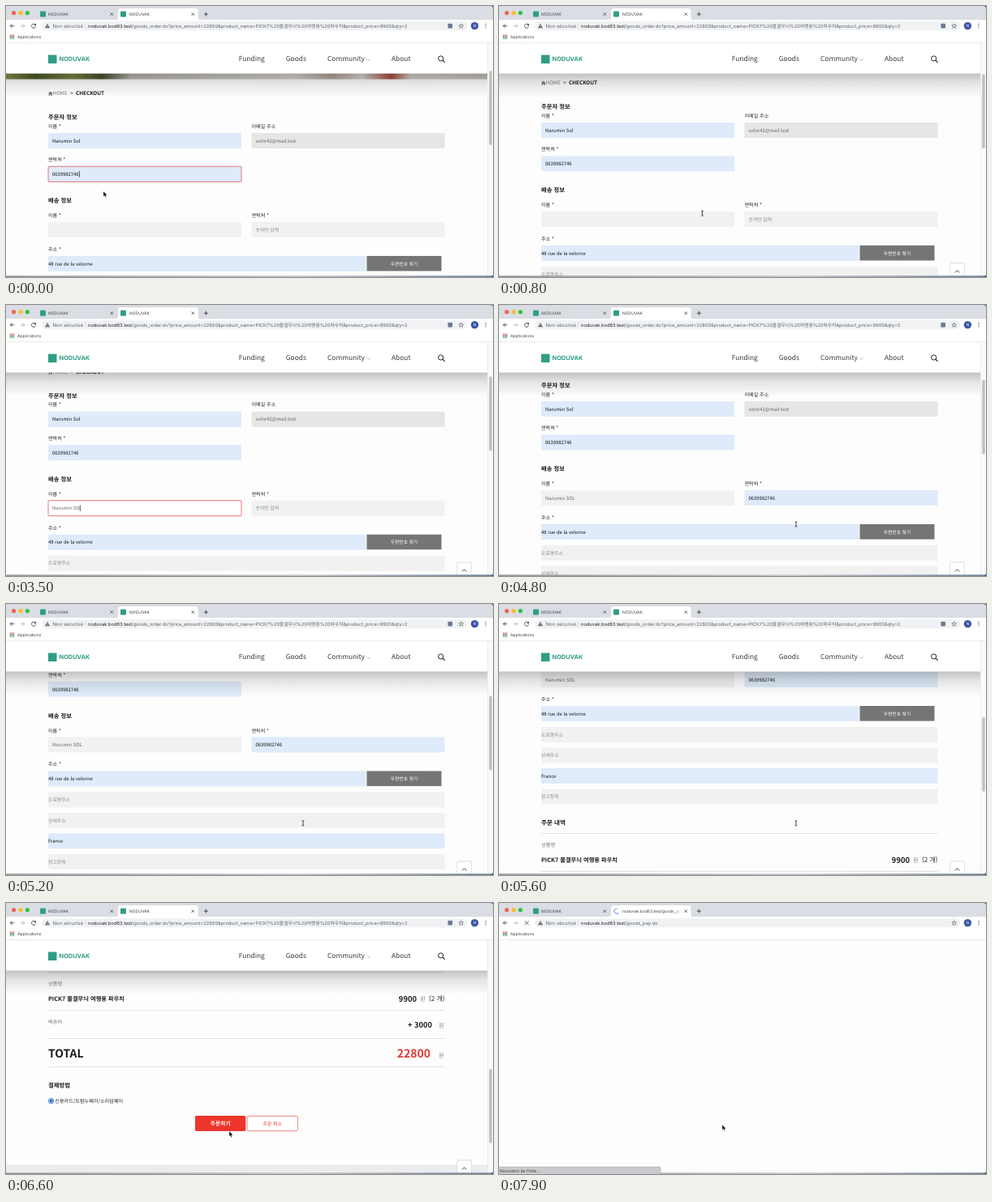
These frames come from a looping animation (600x335 px, 8 s). An HTML page:

```html
<!DOCTYPE html>
<html lang="ko">
<head>
<meta charset="utf-8">
<title>Checkout</title>
<style>
  html, body { margin: 0; width: 100%; height: 100%; overflow: hidden; background: #fdfdfd; }
  svg { display: block; width: 100%; height: 100%; }
  text { font-family: "Noto Sans CJK KR", "Noto Sans KR", "Noto Sans CJK", sans-serif; white-space: pre; text-rendering: geometricPrecision; }
  text.ui { font-family: Inter, "Noto Sans CJK KR", sans-serif; }
</style>
</head>
<body>
<svg id="stage" viewBox="0 0 600 335">
  <defs>
    <linearGradient id="photo">
      <stop offset="0" stop-color="#87934c"/><stop offset=".06" stop-color="#4d5a2a"/>
      <stop offset=".14" stop-color="#7d8b45"/><stop offset=".2" stop-color="#49512f"/>
      <stop offset=".26" stop-color="#bdbab2"/><stop offset=".6" stop-color="#d8d5d1"/>
      <stop offset=".68" stop-color="#b9a79b"/><stop offset=".74" stop-color="#dedbd8"/>
      <stop offset=".8" stop-color="#a8503f"/><stop offset=".84" stop-color="#d9d4cf"/>
      <stop offset="1" stop-color="#c9c4bd"/>
    </linearGradient>
    <linearGradient id="shade" x2="0" y2="1">
      <stop offset="0" stop-opacity=".24"/><stop offset=".4" stop-opacity=".1"/><stop offset="1" stop-opacity="0"/>
    </linearGradient>
    <linearGradient id="fade">
      <stop offset="0" stop-color="#fff" stop-opacity="0"/><stop offset="1" stop-color="#fff"/>
    </linearGradient>
    <linearGradient id="edge">
      <stop offset="0" stop-color="#94979b"/><stop offset=".6" stop-color="#c3c6ca"/><stop offset="1" stop-color="#6f7f98"/>
    </linearGradient>
  </defs>
</svg>
<script>
const LOOP = 8000, STEP = 100;
const RED = '#e8392f', TEAL = '#2f9e84', BLUE = '#dfebfa', GREY = '#f1f1f1', INK = '#1b1b1b', DIM = '#777';
const BRAND = 'NODUVAK', HOST = 'noduvak.bod63.test', PHONE = '0639982746', NAME = 'Narumin SOL';
const ITEM = ['PICK7', '물결무늬', '여행용', '파우치'];
const stage = document.getElementById('stage');

function add(parent, tag, attrs = {}) {
  const node = document.createElementNS('http://www.w3.org/2000/svg', tag);
  set(node, attrs);
  return parent.appendChild(node);
}
function set(node, attrs) {
  for (const key in attrs) node.setAttribute(key, attrs[key]);
}
const group = (parent, attrs) => add(parent, 'g', attrs);
const rect = (parent, x, y, width, height, fill, more) =>
  add(parent, 'rect', { x, y, width, height, fill, ...more });
const dot = (parent, cx, cy, r, fill, more) => add(parent, 'circle', { cx, cy, r, fill, ...more });
const line = (parent, d, stroke, width = 1, more) =>
  add(parent, 'path', { d, stroke, 'stroke-width': width, fill: 'none', ...more });
const show = (node, on) => set(node, { visibility: on ? 'visible' : 'hidden' });

// y is the middle of the capitals
function text(parent, x, y, str, size, fill = INK, more) {
  const node = add(parent, 'text', { x, y: y + size * .36, 'font-size': size, fill, ...more });
  node.textContent = str;
  return node;
}
const ui = (parent, x, y, str, size, fill, more) =>
  text(parent, x, y, str, size, fill, { class: 'ui', ...more });
const BOLD = { 'font-weight': 700 }, MEDIUM = { 'font-weight': 500 };
const MIDDLE = { 'text-anchor': 'middle' }, END = { 'text-anchor': 'end' };

function field(x, y, w, str, fill, color, pad = 5) {
  const box = rect(page, x, y, w, 19, fill, { rx: 1 });
  const label = text(page, x + pad, y + 9.6, str, 5.88, color);
  return { box, label };
}
const label = (x, y, str) => text(page, x, y, str, 6.1, '#222');
const heading = (y, str, size = 7.3) => text(page, 52, y, str, size, INK, BOLD);

rect(stage, 0, 0, 600, 335, '#fdfdfd');

// Shop page, laid out at scroll zero
const shop = group(stage);
const page = group(shop);
rect(page, 0, 46, 593, 44.5, 'url(#photo)');
add(page, 'path', { d: 'M52 108.3L54.8 105.4L57.6 108.3H56.8V111H55.4V109H54.2V111H52.8V108.3Z', fill: DIM });
text(page, 57.6, 108, 'HOME', 6.3, DIM);
text(page, 79.3, 108, '>', 6.3, INK, MEDIUM);
text(page, 86, 108, 'CHECKOUT', 6.4, INK, BOLD);

heading(137.5, '주문자 정보');
label(52, 148.5, '이름 *');
label(302.5, 148.5, '이메일 주소');
field(52, 157, 238, 'Narumin Sol', BLUE, '#111');
field(302.5, 157, 238, 'solnr42@mail.test', '#e6e6e6', '#666');
label(52, 190, '연락처 *');
const phone = field(52, 198.3, 238, PHONE, BLUE, '#111');

heading(240.5, '배송 정보');
label(52, 259, '이름 *');
label(302.5, 259, '연락처 *');
const name = field(52, 267, 238, '', GREY, '#666');
const contact = field(302.5, 267, 238, '', GREY, '#888');
label(52, 300.8, '주소 *');
field(52, 309, 391.5, '48 rue de la velorne', BLUE, '#111', 0);
rect(page, 444.5, 309, 92, 18.6, '#757575');
text(page, 490.5, 318.5, '우편번호 찾기', 5.8, '#fff', MIDDLE);
['도로명주소', '상세주소', 'France', '참고항목'].forEach((str, i) => {
  const filled = i === 2;
  field(52, 335 + i * 25.5, 488.5, str, filled ? BLUE : GREY, filled ? '#111' : '#888', 0);
});

heading(453.5, '주문 내역', 7.6);
for (const y of [466, 513, 548, 583]) rect(page, 52, y, 488.5, .8, '#dedede');
text(page, 52, 481, '상품명', 6.3, DIM);
text(page, 52, 499.3, ITEM.join(' '), 7.25, INK, BOLD);
text(page, 506, 499.3, '9900', 9.4, INK, { ...BOLD, ...END });
text(page, 510, 499.8, '원', 7.3, '#888');
text(page, 521, 499.5, '(2 개)', 8, '#222');
text(page, 52, 528, '배송비', 6.3, DIM);
text(page, 525, 532, '+ 3000', 9.3, INK, { ...BOLD, ...END });
text(page, 533, 532.6, '원', 7.3, '#888');
text(page, 52, 567, 'TOTAL', 13.9, INK, BOLD);
text(page, 523, 567, '22800', 14, '#df3a34', { ...BOLD, ...END });
text(page, 533, 569, '원', 7.3, '#888');
heading(606.3, '결제방법');
dot(page, 55.6, 625.7, 3.2, '#fff', { stroke: '#2c6ccb', 'stroke-width': .9 });
dot(page, 55.6, 625.7, 2.1, '#2c6ccb');
text(page, 60.3, 625.3, '신용카드/도람누페이/소리담페이', 6.15, '#222');
rect(page, 233, 644, 62.3, 19, '#ee352c', { rx: 1.5 });
text(page, 264.3, 653.8, '주문하기', 6.8, '#fff', { ...BOLD, ...MIDDLE });
rect(page, 297, 644.4, 62.3, 18.4, '#fff', { rx: 1.5, stroke: '#e8675f', 'stroke-width': .8 });
text(page, 328.2, 653.8, '주문 취소', 5.9, RED, MIDDLE);
rect(page, 0, 704.5, 593, 60, '#ececec');
const caret = rect(page, 0, 0, .7, 7.4, '#111');

// Fixed shop header
rect(shop, 0, 83, 593, 30, 'url(#shade)');
rect(shop, 0, 45, 593, 38.5, '#fff');
rect(shop, 52, 60.5, 10.5, 10.5, TEAL);
ui(shop, 65.5, 65.8, BRAND, 7.4, TEAL, BOLD);
for (const [x, str] of [[286.8, 'Funding'], [344.8, 'Goods'], [396, 'Community'], [475, 'About']])
  text(shop, x, 65.2, str, 8.4, '#3a3a3a');
line(shop, 'M444.6 65.4L446.7 67.4L448.8 65.4', '#999', .7);
dot(shop, 535.7, 64.9, 3.1, 'none', { stroke: '#222', 'stroke-width': 1 });
line(shop, 'M538 67.2L540.6 69.8', '#222', 1.1);

rect(shop, 593, 46, 7, 289, '#fafafa');
rect(shop, 593, 46, .6, 289, '#e4e4e4');
const thumb = rect(shop, 595.2, 80, 3.6, 92, '#c1c1c1', { rx: 1.8 });

const toTop = group(shop);
rect(toTop, 555.4, 317.6, 18.6, 20, '#000', { opacity: .1, rx: 1.5 });
rect(toTop, 556, 318.2, 17.4, 20, '#fff', { rx: 1, stroke: '#d8d8d8', 'stroke-width': .5 });
line(toTop, 'M561.8 329.6L564.6 326.8L567.4 329.6', '#333', .9);

// Browser frame
rect(stage, 0, 0, 600, 17.5, '#dadde3');
add(stage, 'path', { d: 'M134.5 17.5Q138 17.5 138 14V6Q138 3 141 3H233.5Q236.5 3 236.5 6V14Q236.5 17.5 240 17.5Z', fill: '#fff' });
rect(stage, 0, 17, 600, 28.5, '#fff');
rect(stage, 0, 45, 600, .7, '#dfe1e4');
['#f75f57', '#f9bc2f', '#2fc440'].forEach((fill, i) => dot(stage, 9.6 + i * 8.4, 8.6, 2.6, fill));
rect(stage, 42, 6.6, 7, 7, TEAL, { rx: 1 });
ui(stage, 52, 10.2, BRAND, 5, '#3c4043');
const icon = rect(stage, 141, 6.6, 7, 7, TEAL, { rx: 1 });
const spinner = line(stage, 'M145 7A3.1 3.1 0 1 0 147.4 12.1', '#3f78e0', 1);
const title = ui(stage, 152, 10.2, '', 5, '#3c4043');
rect(stage, 213, 5, 13, 10, 'url(#fade)');
rect(stage, 226, 5, 9.5, 10, '#fff');
rect(stage, 237.5, 5, 14, 10, '#dadde3');
for (const x of [130.3, 230.3])
  line(stage, `M${x - 1.7} 8.4l3.4 3.4m0-3.4l-3.4 3.4`, '#3c4043', .8);
line(stage, 'M243.8 10.1H249M246.4 7.5V12.7', '#3c4043', .9);

line(stage, 'M10.2 24.6H5.2M7.6 22.2L5.2 24.6L7.6 27', '#4a4d51', .9);
line(stage, 'M18 24.6H23M20.6 22.2L23 24.6L20.6 27', '#b4b7ba', .9);
const reload = group(stage);
line(reload, 'M36 22.9A2.6 2.6 0 1 0 36.6 25.4', '#4a4d51', .9);
add(reload, 'path', { d: 'M37 21.4V24.2H34.2Z', fill: '#4a4d51' });
const stop = line(stage, 'M31.8 22.2l4.8 4.8m0-4.8l-4.8 4.8', '#4a4d51', .9);
rect(stage, 44, 19, 524.5, 11.2, '#f0f2f4', { rx: 5.6 });
add(stage, 'path', { d: 'M51 21.7L54 27.2H48Z', fill: '#5f6368' });
rect(stage, 50.7, 23.6, .7, 1.7, '#f0f2f4');
rect(stage, 50.7, 25.8, .7, .7, '#f0f2f4');
ui(stage, 57.6, 24.7, 'Non sécurisé', 6, '#5f6368');
rect(stage, 97.4, 21.5, .5, 6.2, '#c6c9cd');
const address = ui(stage, 101, 24.7, '', 5.75, '#5f6368');
const host = add(address, 'tspan', { fill: '#202124' });
const path = add(address, 'tspan');
host.textContent = HOST;
const translate = rect(stage, 544.4, 21.8, 5.6, 5.6, '#6b7a94', { rx: .8 });
const star = Array.from({ length: 10 }, (_, i) => {
  const a = i * Math.PI / 5, r = i % 2 ? 1.3 : 3;
  return `${560.7 + r * Math.sin(a)},${24.8 - r * Math.cos(a)}`;
});
add(stage, 'polygon', { points: star.join(' '), fill: 'none', stroke: '#4a4d51', 'stroke-width': .6 });
dot(stage, 577.4, 24.6, 4.7, '#3d55a8');
ui(stage, 577.4, 24.6, 'N', 4.6, '#fff', MIDDLE);
for (const y of [22.4, 24.6, 26.8]) dot(stage, 591, y, .65, '#4a4d51');
const apps = ['#d9534a', '#4a4d51', '#3f9e5a'];
for (let i = 0; i < 9; i++)
  rect(stage, 4.8 + i % 3 * 2, 35.4 + Math.floor(i / 3) * 2, 1.4, 1.4, apps[Math.floor(i / 3)]);
ui(stage, 14, 38.2, 'Applications', 5, '#3c4043');

rect(stage, 0, 333.4, 600, 1.6, 'url(#edge)');
add(stage, 'path', { d: 'M597 0H600V3Q600 0 597 0ZM600 331V335H596Q600 335 600 331Z', fill: '#2f4a7a' });
const status = group(stage);
rect(status, -2, 326.3, 201, 11, '#c9cbce', { rx: 1.5, stroke: '#a3a6aa', 'stroke-width': .6 });
ui(status, 1, 331.2, 'Résolution de l’hôte…', 4.9, '#333');

const arrow = add(stage, 'path', { d: 'M0 0V6.6L1.5 5.3L2.6 7.7L3.7 7.2L2.6 4.9H4.6Z', fill: '#000', stroke: '#fff', 'stroke-width': .4 });
const beam = line(stage, 'M-1.4-3.2Q0-3.2 0-2.2Q0-3.2 1.4-3.2M0-2.4V2.4M-1.4 3.2Q0 3.2 0 2.2Q0 3.2 1.4 3.2', '#222', .8);

// Motion tables: [time, values...]
const SCROLL = [[0, 0], [500, 0], [700, 8], [900, 18], [1200, 25.3], [4600, 25.3], [4800, 38], [5000, 66],
  [5200, 102.5], [5400, 141], [5600, 183], [5800, 258], [6000, 330], [6200, 372], [6300, 381]];
const POINTER = [[0, 120, 229], [200, 120, 229], [700, 246, 255], [1100, 264, 260], [1900, 264, 260],
  [2200, 258, 253], [3700, 262, 252], [4100, 366, 253], [4400, 366, 253], [4600, 366, 271], [6000, 366, 271],
  [6400, 275, 282], [6600, 275, 282], [6800, 275, 274]];
const TYPED = [[0, 0], [2700, 1], [2900, 3], [3000, 4], [3100, 6], [3200, 7], [3300, 9], [3500, 10], [3600, 11]];

function glide(table, t) {
  const next = table.findIndex(row => row[0] > t);
  if (next < 0) return table[table.length - 1].slice(1);
  const a = table[next - 1], b = table[next], k = (t - a[0]) / (b[0] - a[0]);
  return a.slice(1).map((v, i) => v + (b[i + 1] - v) * k);
}
const held = (table, t) => table.filter(row => row[0] <= t).pop()[1];
const within = (t, from, to) => t >= from && t < to;

function focus(item, on, plain, active) {
  set(item.box, { fill: on ? active : plain, stroke: on ? '#e4574f' : 'none', 'stroke-width': .8 });
}

const QUERY = `/goods_order.do?price_amount=22800&product_name=${ITEM.join('%20')}&product_price=9900&qty=2`;

function draw(t) {
  const [scroll] = glide(SCROLL, t);
  set(page, { transform: `translate(0 ${-scroll})` });
  set(thumb, { y: 80 + scroll * .328 });
  show(toTop, scroll > 10 && t < 7400);

  const onPhone = t < 600, onName = within(t, 2100, 3800), onContact = within(t, 4100, 4500);
  const auto = t >= 4300;
  focus(phone, onPhone, BLUE, BLUE);
  focus(name, onName, GREY, '#fff');
  focus(contact, onContact, auto ? BLUE : GREY, auto ? BLUE : '#fff');
  name.label.textContent = NAME.slice(0, held(TYPED, t));
  contact.label.textContent = auto ? PHONE : '숫자만 입력';
  set(contact.label, { fill: auto ? '#111' : '#888' });

  const active = onPhone ? phone : onName && t >= 2300 ? name : null;
  if (active) set(caret, {
    x: 57.3 + active.label.getComputedTextLength(),
    y: +active.box.getAttribute('y') + 5.8
  });
  set(caret, { opacity: active ? 1 : 0 });

  const loading = t >= 6900, moved = t >= 7100;
  set(shop, { display: t < 7400 ? 'inline' : 'none' });
  show(reload, !loading);
  show(stop, loading);
  show(icon, !loading);
  show(spinner, loading);
  show(status, loading);
  show(translate, !moved);
  set(spinner, { transform: `rotate(${(t - 7900) * .4} 145 10.1)` });
  title.textContent = moved ? HOST + '/goods_pa' : BRAND;
  path.textContent = moved ? '/goods_pay.do' : QUERY;

  const [x, y] = glide(POINTER, t);
  const isArrow = t < 500 || t >= 6100;
  const hidden = within(t, 2700, 3800);
  for (const shape of [arrow, beam]) set(shape, { transform: `translate(${x} ${y})` });
  show(arrow, isArrow);
  show(beam, !isArrow && !hidden);
}

const start = performance.now();
function tick() {
  const t = (performance.now() - start) % LOOP;
  draw(Math.floor(t / STEP) * STEP);
  requestAnimationFrame(tick);
}
draw(0);
requestAnimationFrame(tick);
</script>
</body>
</html>
```
